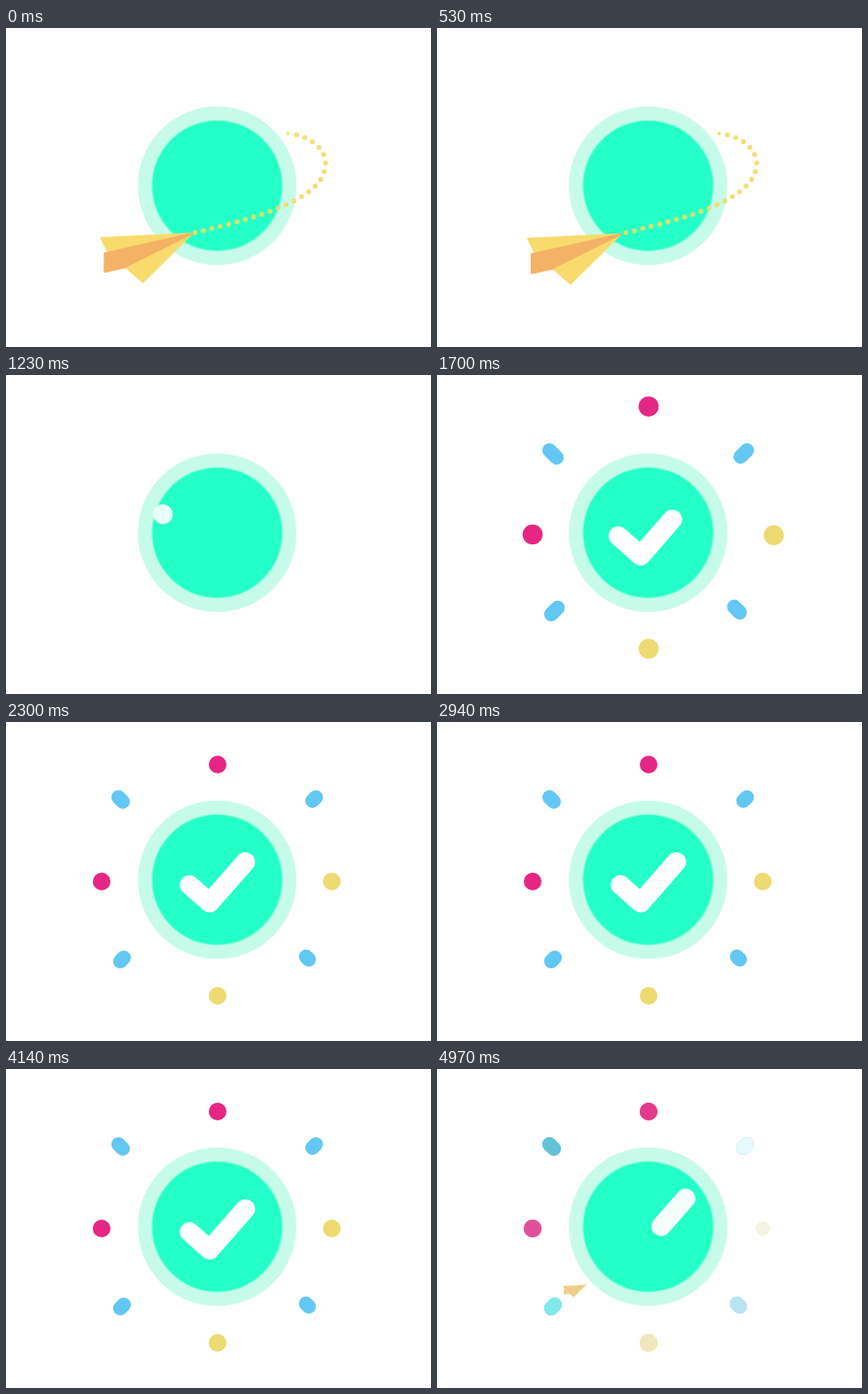
These frames come from a looping animation (480 by 360 pixels, 5.01 s). An HTML page with a canvas:

```html
<!DOCTYPE html>
<html>
<head>
<meta charset="utf-8">
<style>
html, body { margin: 0; width: 100%; height: 100%; overflow: hidden; background: #fff; }
canvas { display: block; }
</style>
</head>
<body>
<canvas id="stage" width="480" height="360"></canvas>
<script>
const ctx = document.getElementById('stage').getContext('2d');
const LOOP = 5010, CX = 238.5, CY = 178;
const PINK = '#e62684', YELLOW = '#edda70', BLUE = '#62c7f3';

const route = document.createElementNS('http://www.w3.org/2000/svg', 'path');
route.setAttribute('d', 'M160 245L210 232C262 218.5 361 198 361 153C361 134 340 121 318.5 119');
const routeLen = route.getTotalLength();
const START = Math.hypot(50, 13), FLIGHT = routeLen - START;

const clamp = (v) => Math.max(0, Math.min(1, v));
const span = (t, a, b) => clamp((t - a) / (b - a));
const easeOut = (u, n) => 1 - (1 - u) ** n;
const smooth = (u) => u * u * (3 - 2 * u);
const mix = (a, b, u) => a + (b - a) * u;

function disc(x, y, r, color) {
  ctx.fillStyle = color;
  ctx.beginPath();
  ctx.arc(x, y, Math.max(0, r), 0, 7);
  ctx.fill();
}

function poly(color, pts) {
  ctx.fillStyle = ctx.strokeStyle = color;
  ctx.lineWidth = 2;
  ctx.lineJoin = 'round';
  ctx.beginPath();
  pts.forEach(([x, y]) => ctx.lineTo(x, y));
  ctx.closePath();
  ctx.fill();
  ctx.stroke();
}

// Coordinates are relative to the nose.
function plane(yellow, orange) {
  poly(yellow, [[-102, 5], [0, 0], [-75, 39], [-94, 21]]);
  poly(yellow, [[0, 0], [-74, 38], [-55, 54.5]]);
  poly(orange, [[0, 0], [-98, 22], [-98, 43], [-76, 38]]);
}

// Final place, overshoot, and the faded colour at the end
const dots = [
  { x: 239, y: 48, dx: 0, dy: -23.5, color: PINK, end: '#e53a8b', shrink: 0 },
  { x: 368, y: 180, dx: 23.5, dy: 1.5, color: YELLOW, end: '#f4f4e4', shrink: 2.5 },
  { x: 239, y: 309, dx: 0, dy: 0, color: YELLOW, end: '#f2e6c0', shrink: 0 },
  { x: 108, y: 180, dx: 0, dy: 0, color: PINK, end: '#e0509a', shrink: 0 }
];
const dashes = [
  { x: 127, y: 85, len: 7, end: '#62c2d6' },
  { x: 350, y: 85, len: 5.6, end: '#e8fafc' },
  { x: 129, y: 270, len: 5.7, end: '#80e9ea' },
  { x: 342, y: 268, len: 4.5, end: '#b9e4f4' }
];

function faded(color, end, fade, draw) {
  draw(color);
  if (!fade) return;
  ctx.globalAlpha = fade;
  draw(end);
  ctx.globalAlpha = 1;
}

function confetti(t) {
  if (t <= 1235) return;
  const fade = span(t, 4805, 4970) ** 2;
  const out = easeOut(span(t, 1235, 1600), 2);
  const settle = smooth(span(t, 1600, 1810));
  for (const d of dots) {
    const x = mix(CX, d.x + d.dx * (1 - settle), out);
    const y = mix(CY, d.y + d.dy * (1 - settle), out);
    const r = mix(12.5 * out, 10, settle) - d.shrink * fade;
    faded(d.color, d.end, fade, (c) => disc(x, y, r, c));
  }
  const head = 75 * (1 - easeOut(span(t, 1235, 1550), 2));
  const tail = 65 * (1 - easeOut(span(t, 1300, 1845), 2));
  for (const d of dashes) {
    const sx = Math.sign(CX - d.x) * Math.SQRT1_2, sy = Math.sign(CY - d.y) * Math.SQRT1_2;
    const far = Math.max(head, d.len + tail);
    faded(BLUE, d.end, fade, (c) => {
      ctx.strokeStyle = c;
      ctx.lineWidth = 16;
      ctx.lineCap = 'round';
      ctx.beginPath();
      ctx.moveTo(d.x + sx * head, d.y + sy * head);
      ctx.lineTo(d.x + sx * far, d.y + sy * far);
      ctx.stroke();
    });
  }
}

function badge() {
  disc(CX, CY, 89.5, '#c6fbea');
  disc(CX, CY, 74.3, '#7ffdd9');
  disc(CX, CY, 73, '#24ffc8');
}

// A window that slides along a long V
function check(t) {
  if (t < 1195) return;
  const u = span(t, 1230, 1900), leave = span(t, 4800, 4970) ** 2;
  const from = mix(40.5 * easeOut(u, 2.05), 106, leave);
  const to = mix(132 * easeOut(u, 2.45), 148, leave);
  ctx.save();
  ctx.globalAlpha = Math.min(mix(0.8, 1, span(t, 1195, 1270)), 1 - 0.05 * leave);
  ctx.strokeStyle = '#fff';
  ctx.lineWidth = 22;
  ctx.lineCap = ctx.lineJoin = 'round';
  ctx.setLineDash([Math.max(0.01, to - from), 999]);
  ctx.lineDashOffset = -from;
  ctx.beginPath();
  ctx.moveTo(177, 157);
  ctx.lineTo(230, 204);
  ctx.lineTo(283, 143.5);
  ctx.stroke();
  ctx.restore();
}

function flight(t) {
  if (t >= 1080) return;
  const pull = Math.sin(Math.PI * span(t, 0, 560));
  const u = span(t, 560, 1070);
  const gone = FLIGHT * (0.2 * u + 0.8 * u * u) - 18 * pull;
  const pos = START + gone;
  ctx.globalAlpha = 0.88;
  for (let s = routeLen, first = true; s > pos; s -= 9.8, first = false) {
    const p = route.getPointAtLength(s);
    disc(p.x, p.y, first ? 1.9 : 2.8, '#efdc62');
  }
  ctx.globalAlpha = 1;

  const p = route.getPointAtLength(pos);
  const a = route.getPointAtLength(pos - 2), b = route.getPointAtLength(pos + 2);
  const turn = u ? Math.atan2(b.y - a.y, b.x - a.x) + Math.atan2(13, 50) : 0;
  const size = u ? clamp(1 - gone / FLIGHT) ** 1.5 : 1 + 0.06 * Math.sqrt(Math.max(0, pull));
  ctx.save();
  ctx.translate(p.x, p.y);
  ctx.rotate(turn);
  ctx.scale(size, size);
  plane('#f8db6c', '#f4b266');
  ctx.restore();
}

function arrival(t) {
  if (t < 4935) return;
  const size = (t - 4930) / 160;
  ctx.save();
  ctx.translate(154, 248);
  ctx.scale(size, size);
  ctx.translate(56, -17);
  plane('#f0d088', '#efcb86');
  ctx.restore();
}

function frame(now) {
  const t = Math.min(now % LOOP, 4970);
  ctx.fillStyle = '#fff';
  ctx.fillRect(0, 0, 480, 360);
  confetti(t);
  badge();
  check(t);
  flight(t);
  arrival(t);
}

const began = performance.now();
(function tick() {
  frame(performance.now() - began);
  requestAnimationFrame(tick);
})();
</script>
</body>
</html>
```
